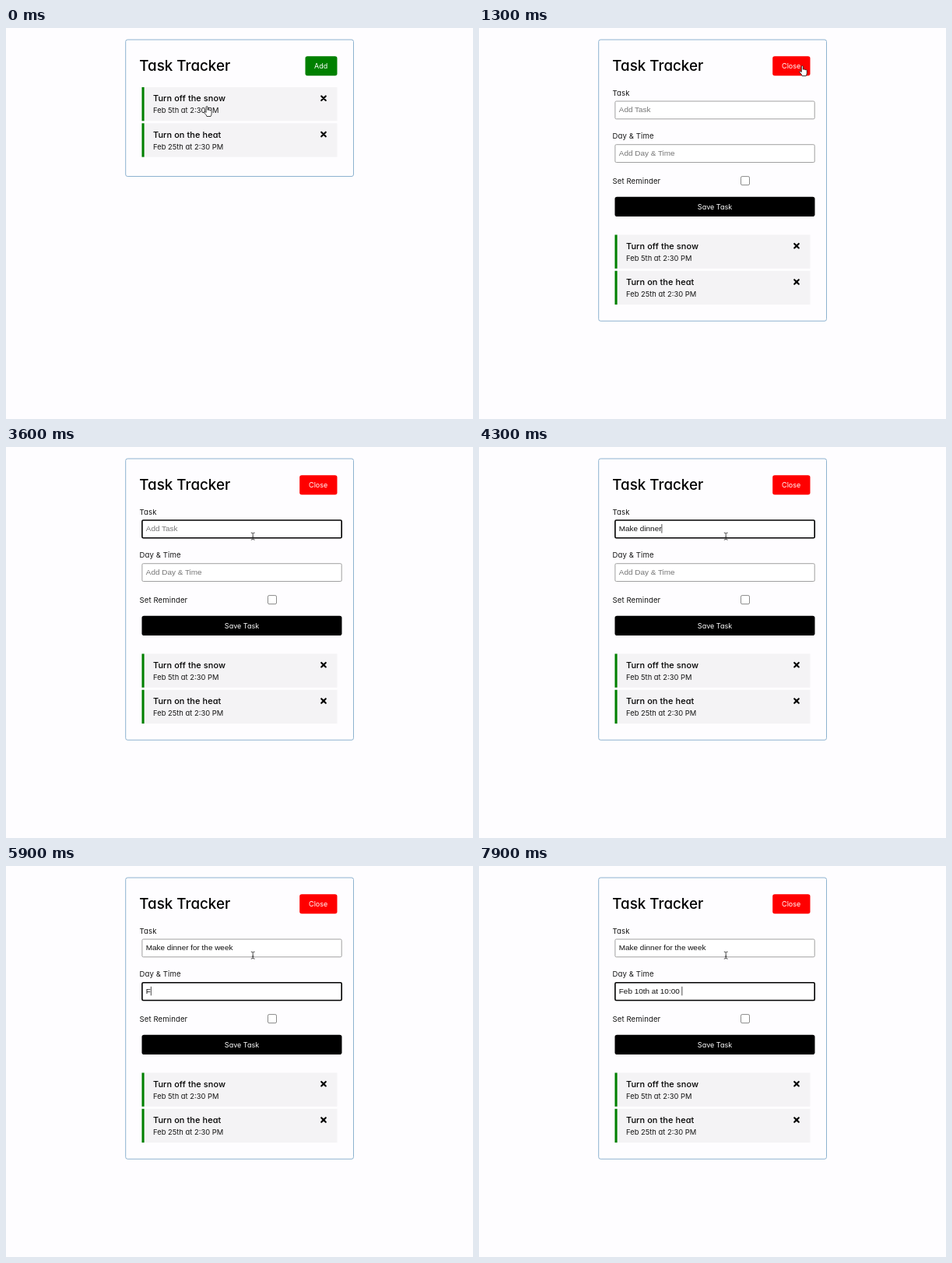
Animation of 600x502 px, one loop 8000 ms. Source, as an HTML page:

```html
<!DOCTYPE html>
<html lang="en">
<head>
<meta charset="utf-8">
<title>Task Tracker</title>
<style>
  html, body { margin: 0; width: 100%; height: 100%; overflow: hidden; background: #fefdff; }
  svg { display: block; width: 600px; height: 502px; }
  text { font: 400 9.4px Inter, sans-serif; font-feature-settings: "cv11"; fill: #161616; white-space: pre; }
  .title { font-size: 18.8px; font-weight: 500; fill: #000; }
  .name { font-size: 10.95px; font-weight: 500; letter-spacing: .08px; fill: #000; }
  .label { font-size: 9.6px; letter-spacing: .08px; }
  .btn { font-size: 9px; fill: #fff; text-anchor: middle; }
  .value { font: 9.95px "Liberation Sans", Arial, sans-serif; fill: #111; }
  .value.empty { fill: #757575; }
  .box { fill: #fff; stroke: #a0a0a0; stroke-width: 1; }
  .box.focus { stroke: #000; stroke-width: 1.6; }
  .cross { stroke: #000; stroke-width: 2.1; stroke-linecap: round; }
  .pointer { fill: #fff; stroke: #111; stroke-width: .8; stroke-linejoin: round; }
  #card { fill: none; stroke: #8db2d0; }
</style>
</head>
<body>
<svg viewBox="0 0 600 502">
  <defs>
    <g id="item">
      <rect x="174.5" y="76" width="251" height="43.3" fill="#f4f3f5"/>
      <rect x="174.5" y="76" width="3.1" height="43.3" fill="#008000"/>
      <path class="cross" d="M405.2 87.4l5.6 5.6m0-5.6l-5.6 5.6"/>
    </g>
  </defs>
  <rect id="card" x="153.7" y="15" width="292.8" rx="2.5"/>
  <text class="title" x="171.3" y="55.4">Task Tracker</text>

  <g id="add">
    <rect x="384.5" y="36.3" width="41" height="25" rx="2.8" fill="#008000"/>
    <text class="btn" x="404.7" y="52.1">Add</text>
  </g>

  <g id="form">
    <rect x="377.2" y="36.3" width="48.3" height="25" rx="2.8" fill="#f00"/>
    <text class="btn" x="401.2" y="52.1">Close</text>
    <text class="label" x="171.6" y="86.6">Task</text>
    <rect class="box" x="174.9" y="94" width="256.3" height="22.8" rx="1.5"/>
    <text class="value" x="179.8" y="108.3"></text>
    <text class="label" x="171.6" y="142.4">Day &amp; Time</text>
    <rect class="box" x="174.9" y="149.7" width="256.3" height="22.8" rx="1.5"/>
    <text class="value" x="179.8" y="164.1"></text>
    <text class="label" x="171.6" y="199.8">Set Reminder</text>
    <rect x="336.5" y="190.6" width="11" height="11" rx="1.6" fill="#fff" stroke="#8a8a8a"/>
    <rect x="174.5" y="216.8" width="257" height="25.2" rx="2.8"/>
    <text class="btn" x="303" y="232.7">Save Task</text>
    <rect id="caret" width=".8" height="11.5" fill="#222"/>
  </g>

  <g id="list">
    <use href="#item"/>
    <text class="name" x="189" y="94.2">Turn off the snow</text>
    <text x="189" y="109.4">Feb 5th at 2:30 PM</text>
    <use href="#item" y="46.3"/>
    <text class="name" x="189" y="140.5">Turn on the heat</text>
    <text x="189" y="155.8">Feb 25th at 2:30 PM</text>
  </g>

  <g id="cursor">
    <path id="hand" class="pointer" d="M-.9 8V1.3a1 1 0 0 1 2 0V5a1 1 0 0 1 1.8.2a1 1 0 0 1 1.7.5a.9.9 0 0 1 1.5.8V9.4Q6.1 11.2 5 13.2H0Q-.5 11-3.2 8.8q-.8-1.3.4-1.6 .9 0 1.9 1z"/>
    <path id="arrow" class="pointer" d="M0 0V10.5L2.5 8.2L4.2 12L5.9 11.3L4.3 7.6H7.5z"/>
    <path id="beam" fill="none" stroke="#333" stroke-width=".9" d="M-2.4-4.5Q0-4.5 0-3.4Q0-4.5 2.4-4.5M0-3.4V3.4M-2.4 4.5Q0 4.5 0 3.4Q0 4.5 2.4 4.5M-1.3 1.4H1.3"/>
  </g>
</svg>
<script>
const LOOP = 8000, STEP = 100;
const OPEN = 1300;
const $ = id => document.getElementById(id);
const show = (el, on) => el.setAttribute('display', on ? 'inline' : 'none');

const boxes = document.querySelectorAll('.box');
const values = document.querySelectorAll('.value');
const fields = [
  { text: 'Make dinner for the week', hint: 'Add Task', focus: 1750, start: 3650, pace: 65, caretY: 99 },
  { text: 'Feb 10th at 10:00 ', hint: 'Add Day & Time', focus: 5600, start: 5850, pace: 118, caretY: 154.8 }
];
const ruler = document.createElement('canvas').getContext('2d');
ruler.font = '9.95px "Liberation Sans", Arial, sans-serif';

// Cursor stops: time, x, y
const stops = [[100, 258, 100.3], [900, 415.2, 48.3], [1350, 415.2, 48.3], [1750, 317.2, 114.6]];

function cursorAt(t) {
  const i = stops.findIndex(s => s[0] > t);
  if (i === 0) return stops[0].slice(1);
  if (i < 0) return stops[stops.length - 1].slice(1);
  const [a, b] = [stops[i - 1], stops[i]];
  const p = (t - a[0]) / (b[0] - a[0]);
  const e = p * p * (3 - 2 * p);
  return [a[1] + (b[1] - a[1]) * e, a[2] + (b[2] - a[2]) * e];
}

function drawCursor(t, open) {
  const [x, y] = cursorAt(t);
  const onButton = x > (open ? 377 : 384) && y > 36 && y < 61;
  const onItem = !open && y > 76;
  const onField = open && y > 93.5;
  $('cursor').setAttribute('transform', `translate(${x} ${y})`);
  show($('hand'), onButton || onItem);
  show($('beam'), onField);
  show($('arrow'), !(onButton || onItem || onField));
}

function drawFields(t) {
  const active = t < fields[0].focus ? -1 : t < fields[1].focus ? 0 : 1;
  fields.forEach((f, i) => {
    const count = t < f.start ? 0 : Math.min(f.text.length, 1 + Math.floor((t - f.start) / f.pace));
    const typed = f.text.slice(0, count);
    values[i].textContent = typed || f.hint;
    values[i].classList.toggle('empty', !count);
    boxes[i].classList.toggle('focus', i === active);
    if (i === active) {
      const last = count ? f.start + (count - 1) * f.pace : f.focus;
      $('caret').setAttribute('x', 179.8 + ruler.measureText(typed).width);
      $('caret').setAttribute('y', f.caretY);
      show($('caret'), (t - last) % 1000 < 500);
    }
  });
  if (active < 0) show($('caret'), false);
}

function draw(t) {
  const open = t >= OPEN;
  const pressed = t >= 1100 && !open;
  show($('form'), open);
  show($('add'), !open);
  $('add').setAttribute('transform', pressed ? 'translate(405 48.8) scale(.98) translate(-405 -48.8)' : '');
  $('card').setAttribute('height', open ? 361.2 : 175.5);
  $('list').setAttribute('transform', `translate(0 ${open ? 189.5 : 0})`);
  drawFields(t);
  drawCursor(t, open);
}

function tick() {
  const t = performance.now() % LOOP;
  draw(Math.floor(t / STEP) * STEP);
  requestAnimationFrame(tick);
}
tick();
</script>
</body>
</html>
```
